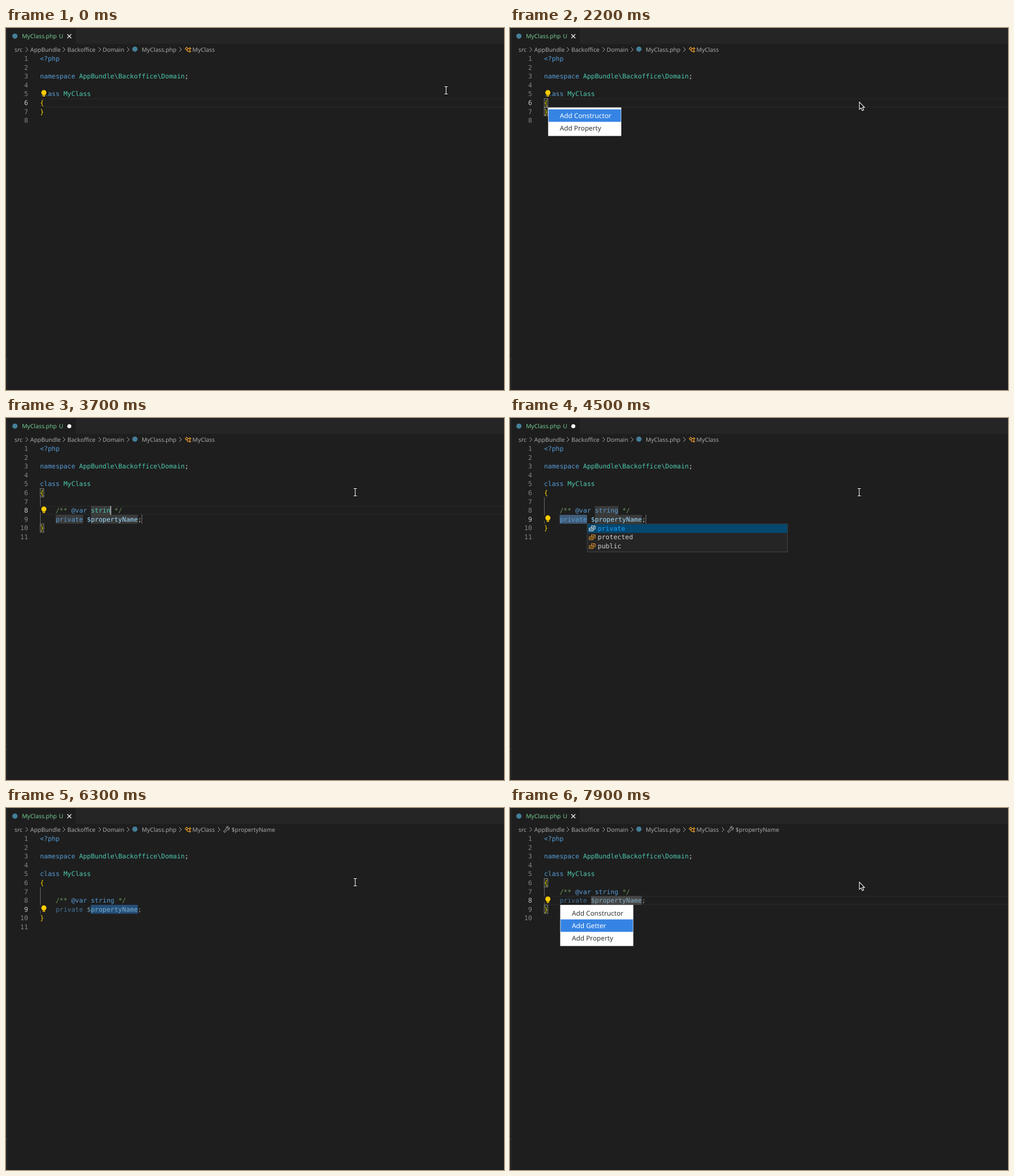
Write an HTML page that moves like this. It is 877 px wide and 639 px high and loops after 8 s.

```html
<!DOCTYPE html>
<html lang="en">
<head>
<meta charset="utf-8">
<title>Adding a property</title>
<style>
  html, body { margin: 0; width: 100%; height: 100%; overflow: hidden; background: #1e1e1e; }
  svg { display: block; width: 100%; height: 100%; }
  text { white-space: pre; text-rendering: geometricPrecision; }
  .code { font: 11.44px "DejaVu Sans Mono", monospace; }
  .ui { font: 10.3px "Noto Sans", sans-serif; }
  .menu { font: 11.75px "Noto Sans", sans-serif; }
</style>
</head>
<body>
<svg id="stage" viewBox="0 0 877 639" xmlns="http://www.w3.org/2000/svg"></svg>
<script>
const LOOP = 8000, STEP = 100;
const CHAR = 6.89, ROW = 15.58;
const KEY = '#569cd6', TYPE = '#4ec9b0', PLAIN = '#d4d4d4', BRACE = '#ffd700',
      NOTE = '#6a9955', VAR = '#9cdcfe', ORANGE = '#ee9d28';
const FIELD = 'rgba(124,124,124,.3)';
const stage = document.getElementById('stage');

const colX = c => 59.9 + CHAR * c;
const rowY = n => 46.3 + ROW * (n - 1);

const esc = s => s.replace(/&/g, '&amp;').replace(/</g, '&lt;');
const rect = (x, y, w, h, fill, more = '') =>
  `<rect x="${x}" y="${y}" width="${w}" height="${h}" fill="${fill}" ${more}/>`;
const circle = (x, y, r, fill) => `<circle cx="${x}" cy="${y}" r="${r}" fill="${fill}"/>`;
const line = (d, color, width = 1, more = '') =>
  `<path d="${d}" fill="none" stroke="${color}" stroke-width="${width}" ${more}/>`;
const text = (cls, x, y, s, fill, more = '') =>
  `<text class="${cls}" x="${x}" y="${y}" fill="${fill}" ${more}>${esc(s)}</text>`;
const at = (x, y, body) => `<g transform="translate(${x} ${y})">${body}</g>`;
const span = (row, from, to, fill) =>
  rect(colX(from), rowY(row), CHAR * (to - from), ROW, fill);

// parts alternate text and colour
function code(row, parts, more = '') {
  let out = '';
  for (let i = 0; i < parts.length; i += 2)
    out += `<tspan fill="${parts[i + 1]}">${esc(parts[i])}</tspan>`;
  return `<text class="code" x="${colX(0)}" y="${rowY(row) + 11.75}" ${more}>${out}</text>`;
}

function crumbs(withProperty) {
  const label = (x, s) => text('ui', x, 41.8, s, '#a9a9a9');
  const chevron = x => line(`M${x - 2} 34l4 4l-4 4`, '#a9a9a9');
  let out = label(15, 'src') + label(42.8, 'AppBundle') + label(108, 'Backoffice') +
    label(170.2, 'Domain') + label(239, 'MyClass.php') + label(328.3, 'MyClass') +
    [36.5, 102, 165, 215, 307].map(chevron).join('') + circle(227, 37.3, 4.6, '#437f99');
  out += at(315, 33, line('M3 .8L5.6 3.4L3 6L.6 3.6ZM5.4 3.4H8M4.4 5V8.2H7', ORANGE, 1.1) +
    line('M9 1.6l1.8 1.8L9 5L7.4 3.4ZM8.6 6.6l1.8 1.6L8.6 9.8L7 8.2Z', ORANGE, 1.1));
  if (withProperty) {
    out += chevron(375) + label(397.2, '$propertyName') +
      at(383, 32, line('M10.4 2.6L8.6 4.4L7 3.8L6.6 2.4L8.4 .8C6 0 4 2 4.8 4.6L.8 8.8Q.2 10 1.2 10.8Q2 11.4 2.8 10.6L6.8 6.6C9.4 7.4 11.4 5 10.4 2.6Z', '#c5c5c5'));
  }
  return out;
}

function tab(dirty) {
  const mark = dirty ? circle(111.5, 14.5, 3.5, '#fff')
                     : line('M108 11l7 7M115 11l-7 7', '#fff', 1.1);
  return rect(0, 0, 877, 28, '#252526') + rect(2.5, 0, 120.5, 28.5, '#1e1e1e') +
    circle(15.7, 14.3, 4.6, '#437f99') + text('ui', 28.2, 18.2, 'MyClass.php', '#73c991') +
    text('ui', 93.3, 18.2, 'U', '#73c991') + mark;
}

function bulb(row) {
  const y = rowY(row);
  return rect(59.5, y + 1, 13.8, 9.5, '#1e1e1e') +
    circle(66.7, y + 5.4, 4.5, '#ffcc00') + rect(64.7, y + 8, 4, 4.3, '#ffcc00') +
    rect(65.7, y + 9.9, 2, .9, '#1e1e1e');
}

function braceBoxes(rows) {
  return rows.map(n => rect(60.3, rowY(n) + .5, 6.2, ROW - 1, 'rgba(0,100,0,.1)',
    'stroke="#888"')).join('');
}

function suggestions() {
  let out = rect(136, 187, 352.7, 49.4, '#252526', 'stroke="#454545"') +
    rect(136.5, 187.5, 351.7, 15.4, '#04476f');
  ['private', 'protected', 'public'].forEach((word, i) => {
    const y = 187.2 + ROW * i, color = i ? ORANGE : '#fff';
    out += line(`M143.5 ${y + 6.5}V${y + 3.5}H150V${y + 9}H147.5M139.5 ${y + 7}H146.5V${y + 12}H139.5ZM141 ${y + 9.5}H145M146 ${y + 6}H148.5`, color) +
      text('code', 154.6, y + 11.6, word, i ? PLAIN : '#18a3ff', i ? '' : 'font-weight="bold"');
  });
  return out;
}

function menu(x, y, items, picked) {
  let out = rect(x, y, 128.8, 5.9 + 22.2 * items.length, '#fff');
  items.forEach((item, i) => {
    const top = y + 3.3 + 22.2 * i, on = i === picked;
    if (on) out += rect(x + .8, top, 127.4, 22, '#3584e4');
    out += text('menu', x + 20.6, top + 15.2, item, on ? '#fff' : '#2e3436');
  });
  return out;
}

function pointer(t, arrow) {
  if (arrow) {
    return at(615.3, 130.8, `<path d="M0 0V12.8L3 10.1L5.2 15L7.5 14L5.4 9.3H9Z" fill="#000" stroke="#fff" stroke-width="1.1"/>`);
  }
  let x = 615, y = 131;
  if (t < 1200) {
    const p = Math.max(0, (t - 200) / 900), e = p * p * (3 - 2 * p);
    x = 775 - 154 * e;
    y = 110 - 39.4 * p + 55.4 * p * p;
  } else if (t < 1400) {
    const left = (1400 - t) / 300;
    x += 6 * left * left;
    y -= 5 * left * left;
  }
  const beam = 'M-3 -6.5H-1Q0 -6.5 0 -5.5V5.5Q0 6.5 -1 6.5H-3M3 -6.5H1Q0 -6.5 0 -5.5V5.5Q0 6.5 1 6.5H3';
  return at(x, y, line(beam, '#000', 2.6) + line(beam, '#fff', 1.2));
}

function caretAt(t, typed) {
  if (t >= 1300 && t < 1800 || t >= 2300 && t < 2700) return [6, 1];
  if (t >= 2700 && t < 3200) return [8, 18];
  if (t >= 3200 && t < 4100) return [8, 13 + typed];
  if (t >= 4100 && t < 4500) return [9, 11];
  if (t >= 4900 && t < 5400 || t >= 5700 && t < 6300) return [9, 25];
  if (t >= 6600 && t < 7500) return [8, 25];
  return null;
}

function draw(t) {
  const within = (a, b = LOOP) => t >= a && t < b;
  const snippet = t >= 2700, tidy = t >= 6600, fresh = within(2700, 2800);
  const docRow = tidy ? 7 : 8, propRow = docRow + 1;
  const lastRow = snippet ? propRow + 1 : 7;
  const active = !snippet ? 6 : t < 4100 ? 8 : tidy ? 8 : 9;
  const typed = [3200, 3300, 3500, 3600, 3700, 3800].filter(k => k <= t).length;
  const word = typed ? 'string'.slice(0, typed) : 'mixed';

  let out = rect(0, 0, 877, 639, '#1e1e1e') + tab(within(2700, 5200) || within(6600, 6800)) +
    rect(0, 0, 2.5, 639, '#252526') + rect(0, 584, 2.5, 1, '#444') + crumbs(t >= 5300);

  if (!snippet || within(3200, 4100) || t >= 7000) {
    const y = rowY(active);
    out += rect(60, y, 817, 1.3, '#292929') + rect(60, y + ROW - 1.3, 817, 1.3, '#292929');
  }

  if (snippet) {
    const select = (row, from, to) => span(row, from, to, '#264f78');
    if (t < 3200) out += select(8, 13, 18);
    else if (within(4100, 4900)) out += select(9, 4, 11);
    else if (within(4900, 7000)) out += select(propRow, 13, 25);
    if (t < 5700) {
      out += span(8, 13, 13 + word.length, FIELD) + span(9, 4, 11, FIELD) +
        span(9, 13, 25, FIELD) + rect(colX(26) - .3, rowY(9), 1, ROW, '#7c7c7c');
    }
    if (t >= 7100) out += span(propRow, 12, 25, '#474747');
    for (let n = 7; n < lastRow; n++)
      out += rect(60, rowY(n), .9, ROW, fresh && n > 7 ? '#404040' : '#707070');
  }

  if (within(1300, 2700)) out += braceBoxes([6, 7]);
  else if (fresh || within(3200, 4100) || t >= 7000) out += braceBoxes([6, lastRow]);

  for (let n = 1; n <= lastRow + 1; n++)
    out += text('code', 38.8, rowY(n) + 11.75, String(n), n === active ? '#c6c6c6' : '#858585',
      'text-anchor="end"');

  out += code(1, ['<?php', KEY]) +
    code(3, ['namespace ', KEY, 'AppBundle\\Backoffice\\Domain', TYPE, ';', PLAIN]) +
    code(5, ['class ', KEY, 'MyClass', TYPE]) + code(6, ['{', BRACE]) + code(lastRow, ['}', BRACE]);

  if (snippet) {
    const tint = color => fresh ? PLAIN : color;
    const wordTint = within(3200, 3900) ? TYPE : KEY;
    out += code(docRow, ['    /** ', tint(NOTE), '@var ', tint(KEY), word, tint(wordTint), ' */', tint(NOTE)]) +
      code(propRow, ['    private ', tint(KEY), '$propertyName', tint(VAR), ';', PLAIN],
        t >= 5500 ? 'opacity=".667"' : '');
  }

  const bulbRow = !snippet ? 5 : t < 3000 ? 0 : t < 4300 ? 8 : propRow;
  if (bulbRow) out += bulb(bulbRow);

  const caret = caretAt(t, typed);
  if (caret) out += rect(colX(caret[1]) - .3, rowY(caret[0]), 1.5, ROW, '#c4c4c2');

  if (within(4100, 4900)) out += suggestions();
  if (within(1800, 2700))
    out += menu(67.2, 140.3, ['Add Constructor', 'Add Property'], t < 2200 ? -1 : t < 2400 ? 0 : 1);
  if (t >= 7300)
    out += menu(88.4, 171.1, ['Add Constructor', 'Add Getter', 'Add Property'],
      t < 7800 ? -1 : t < 7900 ? 0 : 1);

  stage.innerHTML = out + pointer(t, within(1800, 2700) || t >= 7300);
}

let start = null, shown = -1;
function tick(now) {
  if (start === null) start = now;
  const t = Math.floor((now - start) % LOOP / STEP) * STEP;
  if (t !== shown) draw(shown = t);
  requestAnimationFrame(tick);
}
draw(0);
requestAnimationFrame(tick);
</script>
</body>
</html>
```
